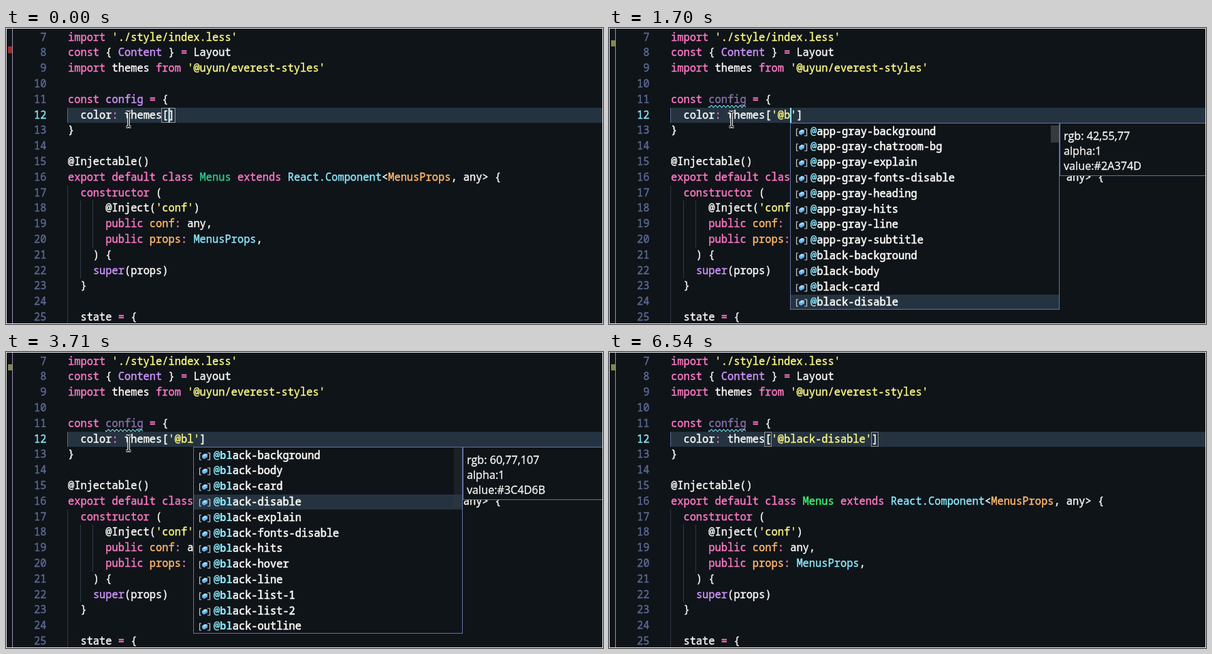
An HTML page with a canvas for the animation above (6710 ms loop, 877 px wide and 434 px high).

```html
<!DOCTYPE html>
<html lang="en">
<head>
<meta charset="utf-8">
<title>Theme completion</title>
<style>
html, body { margin: 0; width: 100%; height: 100%; overflow: hidden; background: #0f1419; }
canvas { display: block; }
</style>
</head>
<body>
<canvas id="stage" width="877" height="434"></canvas>
<script>
const ctx = document.getElementById('stage').getContext('2d');
const W = 877, H = 434, LOOP = 6710;
const LEFT = 91, CHAR = 9.22, ROW = 22.8, ROW12 = 117;
const MONO = '15.37px "Noto Sans Mono", "DejaVu Sans Mono", monospace';
const SANS = '16.2px "Open Sans", "Noto Sans", sans-serif';
const BG = '#0f1419', LINE = '#253340', EDGE = '#6272a4', CYAN = '#8be9fd', GUIDE = '#323a46';
const INK = {
  w: '#fbfbf6', p: '#ff79c6', y: '#fcf884', v: '#d094ff',
  c: CYAN, o: '#ffb86c', g: '#3df56b', t: '#2fc98a', d: '#8770a8'
};

// Each line is made of "~" separated runs; the first letter picks the ink.
const CODE = {
  7: "pimport ~y'./style/index.less'",
  8: 'pconst ~w{ ~vContent~w } ~p= ~wLayout',
  9: "pimport ~wthemes ~pfrom ~y'@uyun/everest-styles'",
  13: 'w}',
  15: 'w@Injectable()',
  17: 'w  ~pconstructor ~w(',
  18: "w      @Inject(~y'conf'~w)",
  19: 'w      ~ppublic ~oconf~p: ~wany,',
  20: 'w      ~ppublic ~oprops~p: ~cMenusProps~w,',
  21: 'w    ) {',
  22: 'w    ~vsuper~w(props)',
  23: 'w  }',
  25: 'w  state ~p= ~w{'
};

const ITEMS = ('app-divide-line app-gray-background app-gray-chatroom-bg app-gray-explain ' +
  'app-gray-fonts-disable app-gray-heading app-gray-hits app-gray-line app-gray-subtitle ' +
  'black-background black-body black-card black-disable black-explain black-fonts-disable ' +
  'black-hits black-hover black-line black-list-1 black-list-2 black-outline')
  .split(' ').map(s => '@' + s);

const TONES = {
  line: [42, 55, 77], background: [22, 35, 61], body: [222, 234, 250],
  card: [32, 47, 76], disable: [60, 77, 107]
};

// The last entry whose time has passed.
const at = (t, track) => track.filter(e => e[0] <= t).pop()[1];

const TYPED = [[0, ''], [230, "''"], [1010, "'@'"], [1470, "'@b'"], [2080, "'@bl'"], [4340, "'@black-disable'"]];
const CARET_COL = [[0, 16], [230, 17], [1010, 18], [1470, 19], [2080, 20], [4340, 31], [4810, 32], [4960, 33]];
const CARET_ON = [[0, 1], [530, 0], [1010, 1], [2630, 0], [3050, 1], [3560, 0], [4110, 1],
  [5510, 0], [6010, 1], [6540, 0]];
const POPUP_COL = [[0, 17], [1010, 18], [1550, 19], [2080, 20]];
const FIRST = [[0, 0], [1700, 1], [1780, 9]];
const PICKED = [[0, -1], [1700, 11], [1780, 0], [2630, 1], [3170, 2], [3710, 3]];
const HITS = [[0, 0], [1010, 1], [1780, 2], [2080, 3]];
const TONE = [[0, 'line'], [1780, 'background'], [2700, 'body'], [3260, 'card'], [3710, 'disable']];
const MOUSE_PATH = [[180, 134], [186, 108], [176, 88], [148, 142], [118, 220], [92, 300], [68, 370], [48, 418]];

const colX = c => LEFT + c * CHAR;
const rowY = n => Math.floor(ROW12 + (n - 12) * ROW);
const baseline = n => rowY(n) + 16;

function box(x, y, w, h, color) {
  ctx.fillStyle = color;
  ctx.fillRect(x, y, w, h);
}

function frame(x, y, w, h, color) {
  ctx.strokeStyle = color;
  ctx.lineWidth = 1;
  ctx.strokeRect(x + .5, y + .5, w - 1, h - 1);
}

// A hairline outline gives the letters their heavier weight.
function text(s, x, y, color, font = MONO, heft = .4) {
  ctx.font = font;
  ctx.fillStyle = ctx.strokeStyle = color;
  ctx.lineWidth = heft;
  ctx.fillText(s, x, y);
  if (heft) ctx.strokeText(s, x, y);
}

function runs(line, n) {
  let col = 0;
  for (const run of line.split('~')) {
    const s = run.slice(1);
    text(s, colX(col), baseline(n), INK[run[0]]);
    col += s.length;
  }
}

function guides() {
  box(90, rowY(17), 1, H, GUIDE);
  box(109, rowY(18), 1, rowY(23) - rowY(18), GUIDE);
  box(127, rowY(18), 1, rowY(21) - rowY(18), GUIDE);
}

function squiggle(x, end, y) {
  ctx.beginPath();
  for (let i = x; i <= end; i += .5) ctx.lineTo(i, y + 1.3 * Math.sin((i - x) * Math.PI / 3));
  ctx.strokeStyle = '#72d8e8';
  ctx.lineWidth = 1.2;
  ctx.stroke();
}

function editor(t) {
  const checked = t >= 610;
  box(0, 0, W, H, BG);
  box(90, ROW12, W - 90, 22, LINE);
  box(90, ROW12, 1, 22, '#596a94');
  box(9, 0, 1, H, '#9a8fb0');
  if (checked) box(3, 18, 6, 9, '#85854b');
  else box(3, 27, 6, 10, '#a52a2a');
  guides();

  ctx.textAlign = 'right';
  for (let n = 7; n <= 25; n++) text(n, 59.5, baseline(n), n === 12 ? CYAN : '#5c6a94');
  ctx.textAlign = 'left';
  for (const n in CODE) runs(CODE[n], +n);
  runs(`pconst ~${checked ? 'd' : 'v'}config ~p= ~w{`, 11);
  runs(`pexport default class ~${checked ? 'g' : 't'}Menus ~pextends ~cReact.Component~w<~oMenusProps~w, any> {`, 16);
  if (checked) squiggle(146, 201, 115);

  const typed = at(t, TYPED);
  if (t < 300 || t >= 4810) {
    for (const c of [15, 16 + typed.length]) frame(Math.round(colX(c)) - 1, ROW12, 11, 22, '#8d9296');
  }
  runs(`w  color~p: ~wthemes[~y${typed}~w]`, 12);
  if (at(t, CARET_ON)) box(Math.round(colX(at(t, CARET_COL))), ROW12, 2, 22, CYAN);
}

function poly(points, color) {
  ctx.beginPath();
  points.forEach(p => ctx.lineTo(...p));
  ctx.closePath();
  ctx.fillStyle = color;
  ctx.fill();
}

// Bracketed cube marking a constant.
function icon(x, y) {
  ctx.strokeStyle = '#c8cbd0';
  ctx.lineWidth = 1.2;
  for (const [edge, lip] of [[0, 3], [15, 12]]) {
    ctx.beginPath();
    ctx.moveTo(x + lip, y - 5);
    ctx.lineTo(x + edge + .5, y - 5);
    ctx.lineTo(x + edge + .5, y + 5);
    ctx.lineTo(x + lip, y + 5);
    ctx.stroke();
  }
  poly([[x + 4, y - 1], [x + 8, y - 4], [x + 12, y - 3], [x + 12, y + 1], [x + 7, y + 4], [x + 4, y + 2]], '#63b4ee');
  poly([[x + 4, y - 1], [x + 8, y - 4], [x + 12, y - 3], [x + 8, y]], '#a5dafa');
}

function thumb(t, right) {
  if (t < 1780) {
    box(right - 13, t < 1700 ? 141 : 143, 12, 25, '#363a3f');
    return;
  }
  const fade = Math.min(1, Math.max(0, (t - 2170) / 900));
  ctx.globalAlpha = 1 - .65 * fade;
  box(right - 13, 141, 12, fade ? 86 : 74, '#363a3f');
  ctx.globalAlpha = 1;
}

function popup(t) {
  const x = Math.round(colX(at(t, POPUP_COL))), right = x + 396;
  const first = at(t, FIRST), picked = at(t, PICKED), hits = at(t, HITS);
  box(x, 139, 396, 274, BG);
  for (let i = 0; i < 12; i++) {
    const y = Math.floor(141 + i * ROW), item = ITEMS[first + i];
    if (i === picked) box(x + 1, y, 394, 22, LINE);
    icon(x + 9, y + 12);
    text(item.slice(0, hits), x + 30, y + 16, CYAN, 'bold ' + MONO, 0);
    text(item.slice(hits), x + 30 + hits * CHAR, y + 16, INK.w, MONO, .6);
  }
  thumb(t, right);
  frame(x, 139, 396, 274, EDGE);
  if (t >= 700) details(right, TONES[at(t, TONE)]);
}

function details(x, rgb) {
  const hex = rgb.map(v => v.toString(16).padStart(2, '0')).join('').toUpperCase();
  box(x, 139, W - x, 78, BG);
  frame(x, 139, W - x + 2, 78, EDGE);
  ['rgb: ' + rgb, 'alpha:1', 'value:#' + hex].forEach((s, i) => text(s, x + 6, 163.5 + i * 22, INK.w, SANS, .3));
}

function mouse(t) {
  if (t >= 6390) return;
  const step = t < 5740 ? 0 : Math.min(7, 1 + Math.floor((t - 5740) / 82));
  const [x, y] = MOUSE_PATH[step];
  ctx.beginPath();
  for (const s of [-1, 1]) {
    ctx.moveTo(x - 3.5, y + s * 11);
    ctx.lineTo(x - 1.5, y + s * 11);
    ctx.lineTo(x, y + s * 9.5);
    ctx.lineTo(x + 1.5, y + s * 11);
    ctx.lineTo(x + 3.5, y + s * 11);
  }
  ctx.moveTo(x, y - 10);
  ctx.lineTo(x, y + 10);
  for (const [w, color] of [[3.6, '#ffffff'], [1.4, '#05080b']]) {
    ctx.lineWidth = w;
    ctx.strokeStyle = color;
    ctx.stroke();
  }
}

function draw(now) {
  const t = now % LOOP;
  editor(t);
  if (t >= 530 && t < 4340) popup(t);
  mouse(t);
  frame(0, 0, W, H, '#e3e6e8');
}

const start = performance.now();
function tick() {
  draw(performance.now() - start);
  requestAnimationFrame(tick);
}
tick();
</script>
</body>
</html>
```
